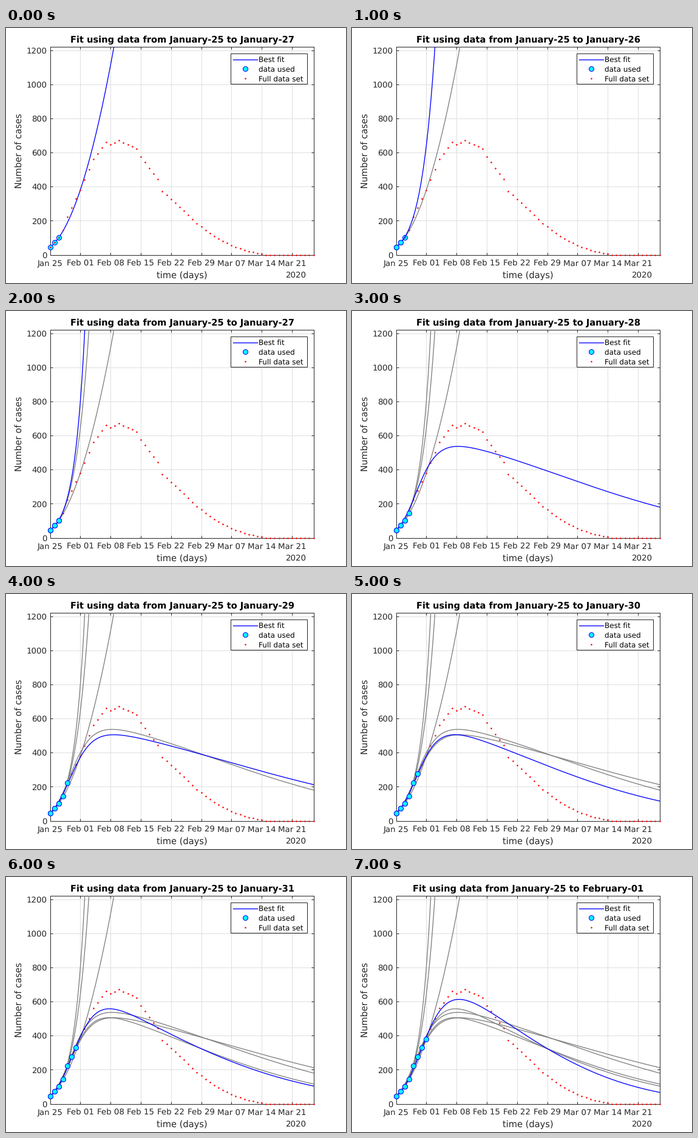
Animation of 560 by 420 pixels, one loop 8 s. Source, as a matplotlib script:

```python
import numpy as np
import matplotlib.pyplot as plt
from matplotlib.animation import FuncAnimation
from matplotlib.patches import Rectangle

W, H, DPI = 560, 420, 80
LEFT, RIGHT, TOP, BOTTOM = 72.5, 506.5, 30.5, 373.5
DAYS, CASES, START = 61, 1221.5, 45
INK, GRID, GREY, BLUE = "#262626", "#dfdfdf", "#808080", "#0000ff"

plt.rcParams["font.family"] = "DejaVu Sans"
plt.rcParams["text.hinting"] = "none"


def px(n):
    """Pixels to points."""
    return n * 72 / DPI


def outbreak(rate, *levels):
    """Sigmoid rise onto a log-quadratic tail through three levels."""
    tail = np.polyfit([21, 35, 61], np.log(levels), 2)
    lag = np.sqrt(np.exp(tail[2]) / START) - 1
    return np.exp(np.polyval(tail, t)) / (1 + lag * np.exp(-rate * t)) ** 2


# Daily counts, linear between turning points
turns = [(0, START), (2, 101), (3, 144), (4, 222), (7, 381), (10, 562),
         (13, 660), (14, 646), (16, 671), (20, 622), (21, 575), (25, 443),
         (26, 373), (30, 281), (34, 184), (38, 107), (42, 55), (46, 19), (50, 0)]
days = np.arange(DAYS + 1)
cases = np.interp(days, *zip(*turns))

# Fitted curves, in order of appearance
t = np.linspace(0, DAYS, 900)
fits = [
    START + 19.3 * t + 4.06 * t**2,
    START * np.exp(12.2 * (1 - np.exp(-0.035 * t))),
    START * np.exp(0.41 * t),
    outbreak(0.36, 508, 392, 180),
    outbreak(0.35, 484, 390, 212),
    outbreak(0.35, 462, 323, 116),
    outbreak(0.325, 500, 323, 104),
    outbreak(0.30, 557, 324, 67),
]
used_counts = [3, *range(2, 9)]

fig = plt.figure(figsize=(W / DPI, H / DPI), dpi=DPI, facecolor="white")
ax = fig.add_axes([LEFT / W, 1 - BOTTOM / H, (RIGHT - LEFT) / W, (BOTTOM - TOP) / H])
ax.set(xlim=(0, DAYS), ylim=(0, CASES),
       xticks=range(0, DAYS, 7), yticks=range(0, 1201, 200))
ax.set_axisbelow(True)
ax.grid(color=GRID, lw=px(1))
ax.tick_params(direction="in", length=px(4.3), width=px(1), color=INK,
               top=True, right=True, labelbottom=False, labelleft=False)
for spine in ax.spines.values():
    spine.set(color=INK, linewidth=px(1))

# Overlay in pixel coordinates for text and legend
ui = fig.add_axes([0, 0, 1, 1], facecolor="none")
ui.set(xlim=(0, W), ylim=(H, 0))
ui.axis("off")


def label(x, y, s, size, ha="center", color=INK, **kw):
    kw.setdefault("va", "baseline")
    return ui.text(x, y, s, fontsize=px(size), ha=ha, color=color, **kw)


DOT = dict(ls="", marker="o", ms=px(2.6), mfc="#ff0000", mec="none")
RING = dict(ls="", marker="o", ms=px(8), mfc="#00ffff", mec=BLUE, mew=px(1))
LINE = px(1.33)

title = label(290, 24, "", 44 / 3, color="black", weight="bold")
label(290, 412, "time (days)", 44 / 3)
label(26, 202, "Number of cases", 44 / 3, rotation=90, rotation_mode="anchor")
label(477, 411, "2020", 40 / 3)
dates = ["Jan 25", "Feb 01", "Feb 08", "Feb 15", "Feb 22", "Feb 29",
         "Mar 07", "Mar 14", "Mar 21"]
for i, date in enumerate(dates):
    label(LEFT + 7 * i * (RIGHT - LEFT) / DAYS, 392, date, 40 / 3)
for v in range(0, 1201, 200):
    label(67.5, BOTTOM - v * (BOTTOM - TOP) / CASES + 5, str(v), 40 / 3, ha="right")

ui.add_patch(Rectangle((369.5, 41.5), 126, 50, fc="white", ec=INK, lw=px(1)))
ui.plot([373.5, 413.5], [51.5, 51.5], color=BLUE, lw=LINE)
ui.plot([393.5], [67], **RING)
ui.plot([393.5], [82.5], **DOT)
for i, name in enumerate(["Best fit", "data used", "Full data set"]):
    label(416.5, 56 + 16 * i, name, 12, ha="left", color="black")

# The first curve, its markers and the full data lie beneath later curves
curves = [ax.plot(t, f, lw=LINE, zorder=2.6 if i == 0 else 3 + 0.1 * i)[0]
          for i, f in enumerate(fits)]
first = used_counts[0]
ax.plot(days[:first], cases[:first], clip_on=False, zorder=2.7, **RING)
ax.plot(days, cases, clip_on=False, zorder=2.8, **DOT)
used, = ax.plot([], [], clip_on=False, zorder=5, **RING)


def update(i):
    n = used_counts[i]
    last = 24 + n
    end = f"January-{last:02d}" if last <= 31 else f"February-{last - 31:02d}"
    title.set_text(f"Fit using data from January-25 to {end}")
    for k, curve in enumerate(curves):
        curve.set_visible(k <= i)
        curve.set_color(BLUE if k == i else GREY)
    shown = n if i > 0 else 0
    used.set_data(days[:shown], cases[:shown])
    return [title, used, *curves]


anim = FuncAnimation(fig, update, frames=len(fits), interval=1000,
                     repeat=True, repeat_delay=0, blit=False)
plt.show()
```
